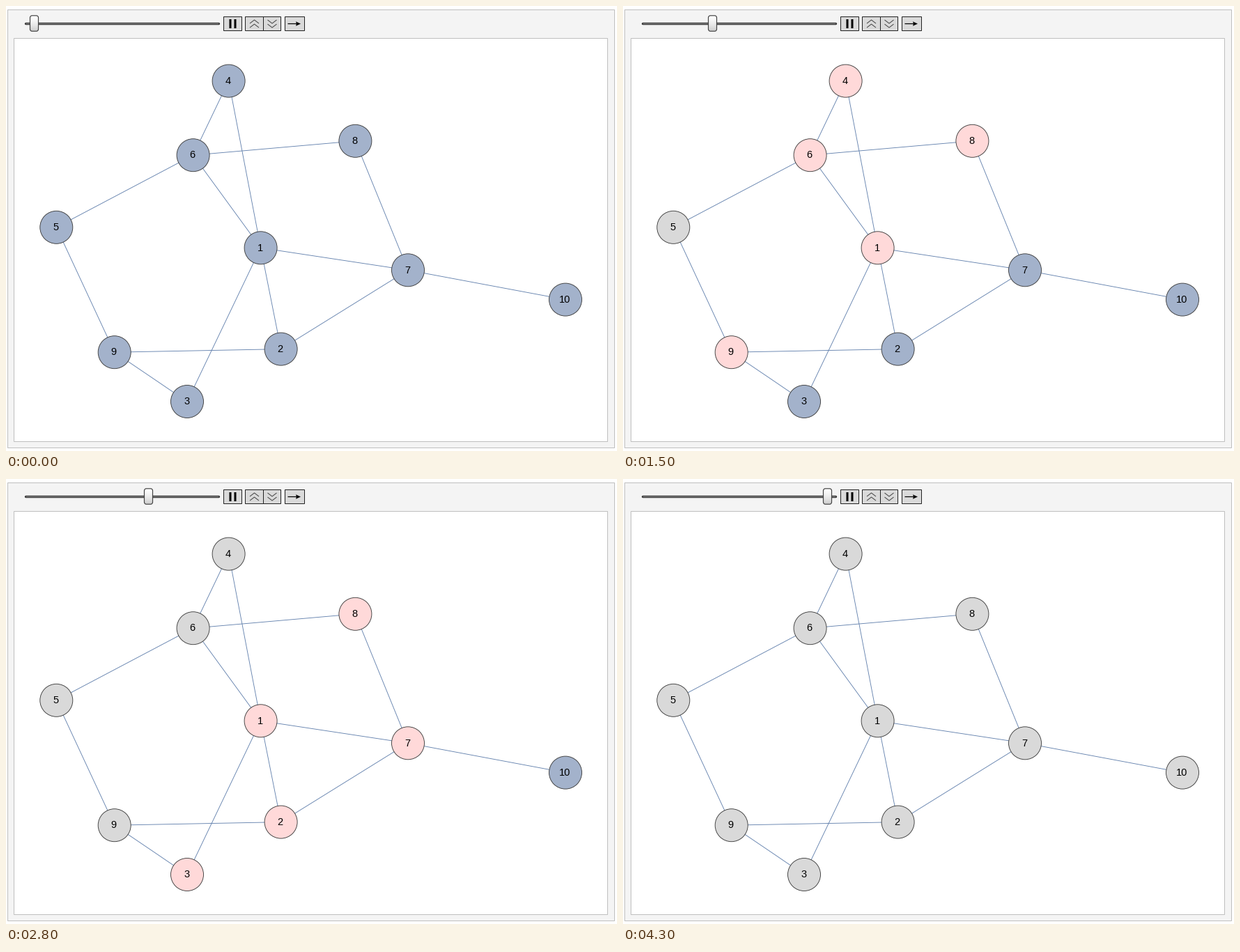
These frames come from a looping animation (877x639 px, 4.5 s). A matplotlib script:

```python
import math

import matplotlib.pyplot as plt
import numpy as np
from matplotlib.animation import FuncAnimation
from matplotlib.patches import Circle, FancyBboxPatch, Polygon, Rectangle

W, H, DPI = 877, 639, 64
PX = 72 / DPI  # points per pixel
FRAMES, INTERVAL = 45, 100

UNSEEN, QUEUED, DONE = "#a3b2cb", "#ffd9d9", "#d9d9d9"
BAR_Y = 25.5
THUMB_W, THUMB_TOP, THUMB_BOTTOM = 12, 13.8, 36.2

# Key points of the layout, and walks that together cross every edge once
POINTS = [(365.6, 347.3), (394.6, 492.6), (260, 568), (319.6, 107.6), (72.3, 317.8),
          (268.6, 214.2), (577, 379.3), (501.4, 193.8), (155.7, 497.2), (803, 421.6)]
NODES = dict(enumerate(POINTS, start=1))
WALKS = [(5, 6, 4, 1, 6, 8, 7, 1, 2, 9, 3, 1), (5, 9), (2, 7, 10)]
EDGES = [edge for walk in WALKS for edge in zip(walk, walk[1:])]


def breadth_first(start):
    """Return the node colours after each step of the search."""
    colors = dict.fromkeys(NODES, UNSEEN)
    states = [dict(colors)]

    def paint(node, color):
        colors[node] = color
        states.append(dict(colors))

    queue = [start]
    paint(start, QUEUED)
    while queue:
        node = queue.pop(0)
        for a, b in EDGES:
            other = b if node == a else a
            if node in (a, b) and colors[other] == UNSEEN:
                queue.append(other)
                paint(other, QUEUED)
        paint(node, DONE)
    return states


plt.rcParams["path.snap"] = False
fig = plt.figure(figsize=(W / DPI, H / DPI), dpi=DPI, facecolor="white")
ax = fig.add_axes([0, 0, 1, 1])
ax.axis("off")


def line(xs, ys, color, width, z=2, cap="butt"):
    ax.plot(xs, ys, color=color, lw=width * PX, zorder=z,
            solid_capstyle=cap, solid_joinstyle="miter")


def box(x0, y0, x1, y1, face, edge):
    ax.add_patch(Rectangle((x0, y0), x1 - x0, y1 - y0, fc=face, ec=edge,
                           lw=PX, zorder=1))


def button(left, width):
    box(left, 15.5, left + width, 35.5, "#dadada", "#222222")
    return left + width / 2


def chevrons(x, direction):
    for y in (BAR_Y - 3, BAR_Y + 3):
        ends, tip = y + 2.5 * direction, y - 2.5 * direction
        line([x - 6.5, x, x + 6.5], [ends, tip, ends], "#444444", 1)


# Panel and content area
box(2.5, 5.5, 873.5, 634.5, "#f4f4f4", "#bfbfbf")
box(11.5, 46.5, 863.5, 625.5, "white", "#bfbfbf")

# Slider track
line([28.5, 305.5], [BAR_Y, BAR_Y], "#383838", 3.4, cap="round")
line([29, 305], [BAR_Y, BAR_Y], "#8c8c8c", 1, z=3, cap="round")

# Buttons
pause = button(312.5, 26)
for x in (pause - 3.5, pause + 3.5):
    line([x, x], [BAR_Y - 6.5, BAR_Y + 6.5], "black", 3)
chevrons(button(343.5, 26), 1)
chevrons(button(369.5, 25), -1)
arrow = button(400.5, 28)
line([arrow - 10, arrow + 4], [BAR_Y, BAR_Y], "black", 1.2)
ax.add_patch(Polygon([(arrow + 8.5, BAR_Y), (arrow + 1.5, BAR_Y - 3.2),
                      (arrow + 2.5, BAR_Y), (arrow + 1.5, BAR_Y + 3.2)],
                     fc="black", lw=0, zorder=3))

# Slider thumb
thumb = FancyBboxPatch((0, THUMB_TOP), THUMB_W, THUMB_BOTTOM - THUMB_TOP,
                       boxstyle="round,pad=0,rounding_size=3",
                       fc="none", ec="#444444", lw=1.2 * PX, zorder=6)
ax.add_patch(thumb)
shade = 1 - 0.2 * np.linspace(0, 1, 32) ** 1.5
thumb_fill = ax.imshow(shade[:, None], cmap="gray", vmin=0, vmax=1, aspect="auto",
                       extent=(0, THUMB_W, THUMB_BOTTOM, THUMB_TOP), zorder=5)
thumb_fill.set_clip_path(thumb)

# Graph
for a, b in EDGES:
    line(*zip(NODES[a], NODES[b]), "#6482ae", 0.9)
circles = {}
for node, (x, y) in NODES.items():
    circles[node] = ax.add_patch(Circle((x, y), 23.5, ec="#3c3c3c", lw=0.9 * PX, zorder=4))
    ax.text(x - 0.9, y + 4.2, str(node), ha="center", va="baseline", zorder=5,
            family="Liberation Sans", fontsize=14.67 * PX, color="black")

STATES = breadth_first(5)


def update(frame):
    step = (frame + 1) * 5 // 11  # every fifth step lasts one tick longer
    left = math.floor(34 + 12.68 * step) + 0.5
    thumb.set_x(left)
    thumb_fill.set_extent((left, left + THUMB_W, THUMB_BOTTOM, THUMB_TOP))
    ax.set(xlim=(0, W), ylim=(H, 0))
    for node, color in STATES[step].items():
        circles[node].set_facecolor(color)
    return [thumb, thumb_fill, *circles.values()]


anim = FuncAnimation(fig, update, frames=FRAMES, interval=INTERVAL,
                     repeat=True, repeat_delay=0, blit=False)
plt.show()
```
